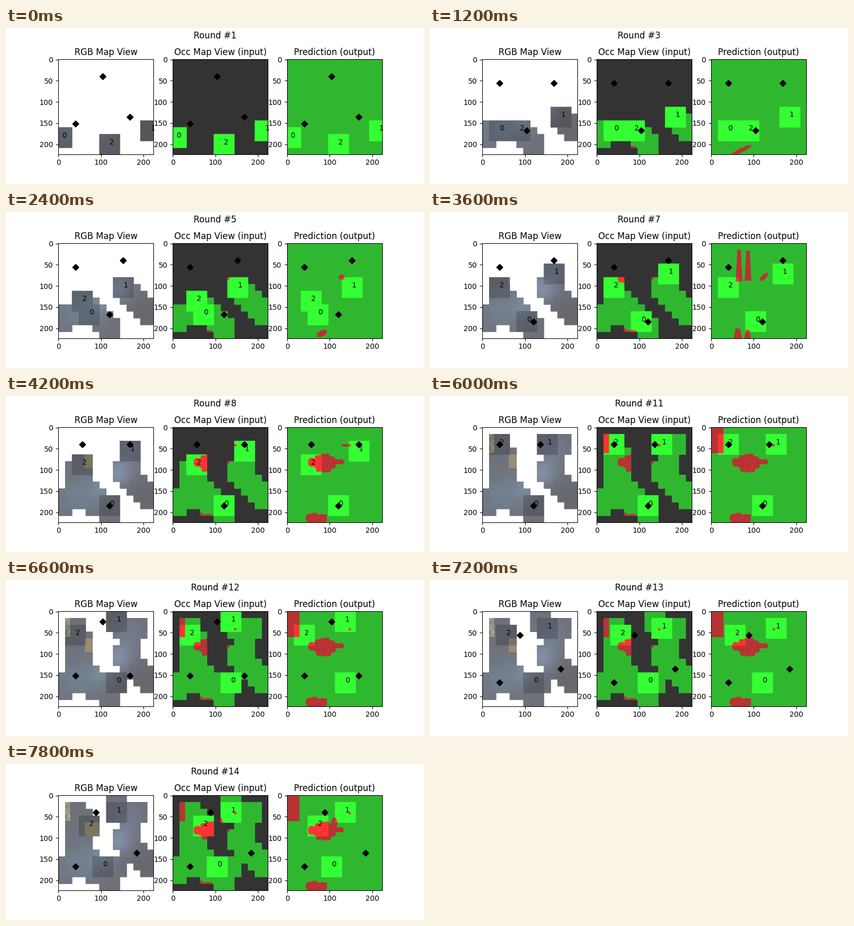
A matplotlib script that plays this animation: 800 by 300 pixels, repeating every 8 s.

```python
import numpy as np
import matplotlib.pyplot as plt
from matplotlib.animation import FuncAnimation

SIZE, CELL = 224, 16
ROUNDS, TICK, TICKS_PER_ROUND = 14, 200, 3

DARK = (51, 51, 51)
GREEN, GREEN_LIT = (48, 183, 48), (51, 255, 51)
RED, RED_LIT = (184, 51, 51), (255, 51, 51)

# per agent: starting (column, row) and its goals by first round;
# each round the agent takes one step towards its goal
AGENTS = [
    ((0, 11), {1: (2, 9), 2: (6, 10), 5: (7, 10), 6: (7, 11),
               12: (10, 9), 13: (2, 10)}),
    ((13, 10), {1: (10, 8), 2: (10, 3), 5: (9, 2), 6: (10, 2), 9: (11, 2),
                10: (8, 2), 12: (6, 1), 13: (11, 8), 14: (5, 2)}),
    ((7, 12), {1: (6, 2), 2: (2, 3), 8: (3, 2), 10: (2, 2), 12: (2, 9),
               13: (5, 3), 14: (11, 8)}),
]

ys, xs = np.mgrid[:SIZE, :SIZE]


def current(table, n):
    return table[max(k for k in table if k <= n)]


def centre(cell):
    return tuple(CELL * v + CELL / 2 for v in cell)


def blob(x, y, rx, ry, power=2, tilt=0, rough=0.05):
    """Mask of a tilted superellipse with a slightly ragged rim."""
    a = np.radians(tilt)
    dx, dy = xs - x, ys - y
    u = (dx * np.cos(a) + dy * np.sin(a)) / rx
    v = (dy * np.cos(a) - dx * np.sin(a)) / ry
    turn = np.arctan2(v, u)
    rim = 1 + rough * (np.sin(7 * turn + x) + np.sin(11 * turn + y))
    return abs(u) ** power + abs(v) ** power < rim ** power


def column(x, top, bottom, width):
    """Mask of an upright bar that widens downwards."""
    half = width * (0.3 + 0.25 * (ys - top) / (bottom - top))
    return (abs(xs - x) < half) & (ys >= top) & (ys < bottom)


def merge(*masks):
    return np.logical_or.reduce(masks)


def view(cell):
    left, top = (CELL * (v - 1) for v in cell)
    return (xs >= left) & (xs < left + 49) & (ys >= top) & (ys < top + 49)


rock = merge(blob(87, 84, 27, 22), blob(58, 82, 9, 10, 3),
             blob(115, 81, 18, 6, 3))
knob = blob(110, 66, 7, 14)
stone = blob(146, 42, 3, 3)
wall = (xs < 29) & (ys < 61)
ridge = merge(blob(59, 216, 15, 14, 4, tilt=-12), blob(82, 214, 11, 10, 4))
pillars = merge(column(65, 15, 90, 14), column(86, 18, 88, 14),
                blob(123, 79, 13, 5, tilt=-45),
                column(62, 201, SIZE, 18), column(85, 204, SIZE, 14))

truth = merge(rock, knob, stone, wall, ridge)
PREDICTED = {
    1: np.zeros((SIZE, SIZE), bool),
    2: blob(70, 214, 27, 5, tilt=-26),
    5: merge(blob(81, 212, 13, 7, tilt=-28), blob(127, 80, 7, 6)),
    7: pillars,
    8: merge(rock, ridge, blob(138, 42, 11, 2.5, 4)),
    11: merge(rock, stone, wall, ridge),
    14: truth,
}


def make_terrain():
    rng = np.random.default_rng(4)
    land = np.full((SIZE, SIZE, 3), (111.0, 114, 123))

    def glow(x, y, spread, tint):
        level = np.exp(-((xs - x) ** 2 + (ys - y) ** 2) / (2 * spread ** 2))
        land[:] += level[..., None] * np.array(tint)

    glow(45, 160, 35, (4, 14, 20))
    glow(98, 145, 20, (10, 20, 24))
    glow(140, 108, 22, (20, 28, 40))
    glow(165, 60, 28, (4, 8, 16))
    glow(200, 165, 35, (-8, -9, -12))
    land += np.kron(rng.normal(0, 3, (112, 112, 3)), np.ones((2, 2, 1)))
    land[64:97, 62:100] = (152, 142, 118)
    speckle = rng.normal(0, 18, (11, 3, 3)) + (150, 152, 138)
    land[16:60, 16:28] = np.kron(speckle, np.ones((4, 4, 1)))
    return land


def paint(blocked, lit):
    lit = lit[..., None]
    return np.where(blocked[..., None], np.where(lit, RED_LIT, RED),
                    np.where(lit, GREEN_LIT, GREEN))


def build_rounds():
    land = make_terrain()
    seen = np.zeros((SIZE, SIZE), bool)
    cells = [np.array(start) for start, _ in AGENTS]
    for n in range(1, ROUNDS + 1):
        goals = [np.array(current(plan, n)) for _, plan in AGENTS]
        if n > 1:
            cells = [c + np.sign(g - c) for c, g in zip(cells, goals)]
        lit = merge(*map(view, cells))
        seen = seen | lit
        known = seen[..., None]
        shade = np.where(lit, 0.82, 1.0)[..., None]
        images = [np.where(known, land * shade, 255),
                  np.where(known, paint(truth, lit), DARK),
                  paint(current(PREDICTED, n), lit)]
        yield ([img.clip(0, 255).astype(np.uint8) for img in images],
               [centre(c) for c in cells], [centre(g) for g in goals])


scenes = list(build_rounds())

fig, axes = plt.subplots(1, 3, figsize=(8, 3), dpi=100)
heading = fig.suptitle("Round #1")
panels = []
for ax, title in zip(axes, ["RGB Map View", "Occ Map View (input)",
                            "Prediction (output)"]):
    ax.set_title(title)
    picture = ax.imshow(np.zeros((SIZE, SIZE, 3), np.uint8))
    marks, = ax.plot([], [], "kD", ms=6)
    labels = [ax.text(0, 0, str(i)) for i in range(len(AGENTS))]
    ax.set_xlim(-0.5, SIZE - 0.5)
    ax.set_ylim(SIZE - 0.5, -0.5)
    panels.append((picture, marks, labels))


def update(tick):
    n = tick // TICKS_PER_ROUND
    images, spots, goals = scenes[n]
    heading.set_text(f"Round #{n + 1}")
    for img, (picture, marks, labels) in zip(images, panels):
        picture.set_data(img)
        marks.set_data(*zip(*goals))
        for label, spot in zip(labels, spots):
            label.set_position(spot)


anim = FuncAnimation(fig, update, frames=8000 // TICK, interval=TICK,
                     repeat=True, repeat_delay=0)
plt.show()
```
